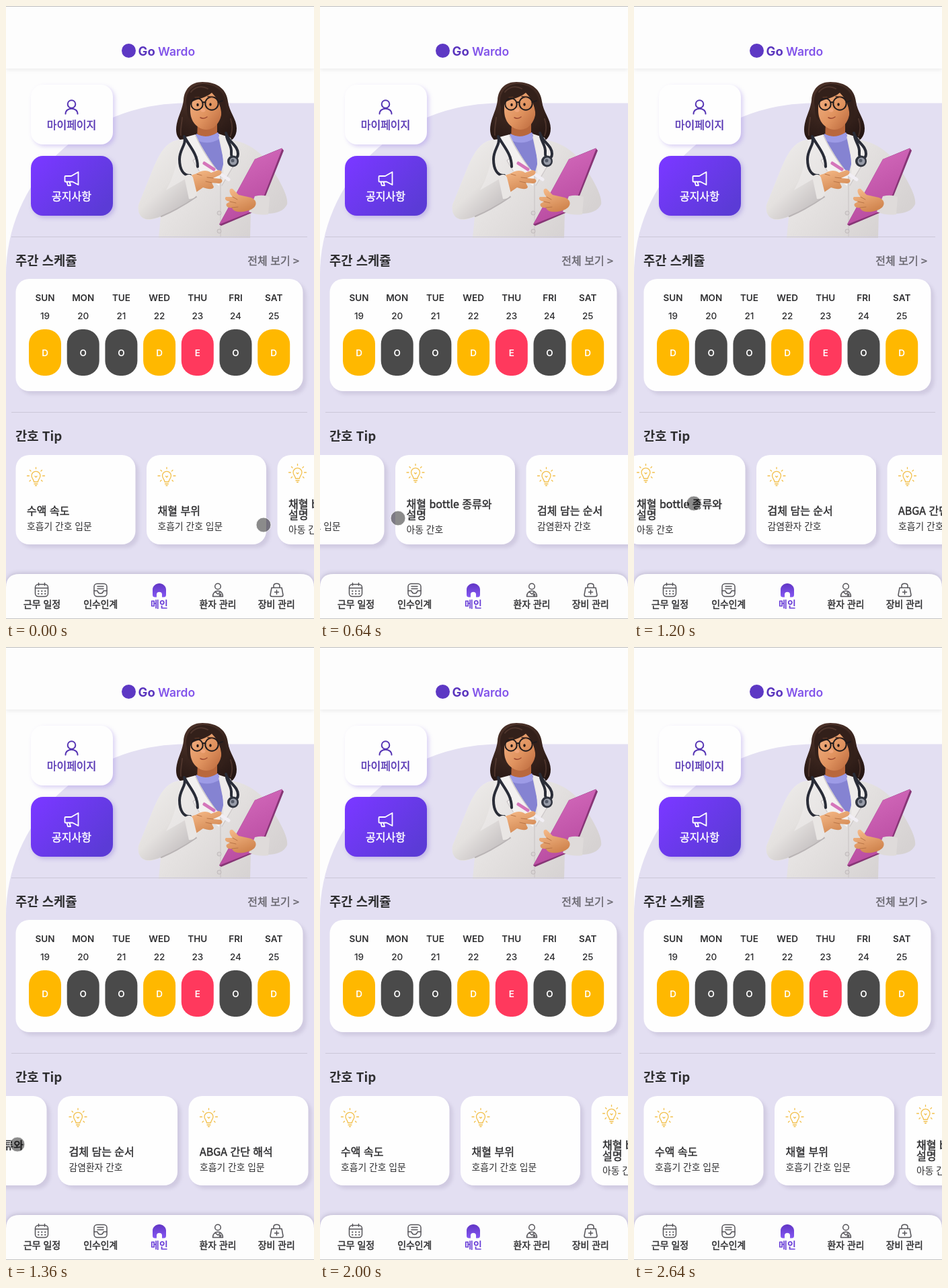
Recreate the animation shown at these times as an HTML page. Size 458 by 912 pixels, loop 2.72 s.

```html
<!DOCTYPE html>
<html lang="ko">
<head>
<meta charset="utf-8">
<title>Nursing home screen</title>
<style>
html, body { margin: 0; width: 100%; height: 100%; overflow: hidden; background: #fdfdfd; }
svg { display: block; width: 458px; height: 912px; }
text { --ink: #2e2e30; font-family: "Noto Sans CJK KR", "Noto Sans CJK", sans-serif; fill: var(--ink); }
.num text, .logo { font-family: Inter, "Noto Sans", sans-serif; }
.mid { text-anchor: middle; }
.h { font-size: 18.8px; font-weight: 700; }
/* The Korean face has no medium weight, so a hairline stroke thickens it. */
.medium { stroke: var(--ink); stroke-width: .45px; }
.btn, .title, .more { font-size: 16px; }
.sub { font-size: 13.8px; }
.num { font-size: 13.5px; }
.nav { font-size: 13.9px; }
.line { fill: none; stroke-linecap: round; stroke-linejoin: round; }
.panel { fill: #fefefe; filter: drop-shadow(5px 5px 2.5px rgba(70, 60, 105, .12)); }
.rule { stroke: #cbc7d8; stroke-width: 1; }
</style>
</head>
<body>
<svg viewBox="0 0 458 912">
  <defs>
    <linearGradient id="violet" x2="1" y2=".7">
      <stop offset=".1" stop-color="#7838ff"/><stop offset="1" stop-color="#5b3bd6"/>
    </linearGradient>
    <linearGradient id="home" x2="0" y2="1">
      <stop stop-color="#6035c4"/><stop offset="1" stop-color="#8558f3"/>
    </linearGradient>
    <linearGradient id="coat" x2="1" y2=".6">
      <stop stop-color="#f4f2f1"/><stop offset=".55" stop-color="#e4e1e0"/><stop offset="1" stop-color="#d6d2d2"/>
    </linearGradient>
    <linearGradient id="sleeve" x2=".7" y2="1">
      <stop stop-color="#f1efee"/><stop offset=".6" stop-color="#e4e1df"/><stop offset="1" stop-color="#c2bdbe"/>
    </linearGradient>
    <linearGradient id="board" x2=".4" y2="1">
      <stop stop-color="#d86fc0"/><stop offset="1" stop-color="#b74a9f"/>
    </linearGradient>
    <radialGradient id="hair" cx=".4" cy=".2" r=".85">
      <stop stop-color="#573a30"/><stop offset=".5" stop-color="#3a251e"/><stop offset="1" stop-color="#251613"/>
    </radialGradient>
    <linearGradient id="face" x2="1" y2="1">
      <stop stop-color="#f3b285"/><stop offset=".55" stop-color="#e0935f"/><stop offset="1" stop-color="#b9663b"/>
    </linearGradient>
    <linearGradient id="hand" x2=".5" y2="1">
      <stop stop-color="#f8bd8c"/><stop offset="1" stop-color="#d18650"/>
    </linearGradient>
    <g id="bulb" class="line" stroke="#f2c04d" stroke-width="1.300">
      <path d="M10.500 21.500C10.500 17.500 7 16.500 7 12.300A6.500 6.500 0 0 1 20 12.300C20 16.500 16.500 17.500 16.500 21.500ZM11 24.500H16M12.500 27H14.500M12 13L13.500 14.500L15 13"/>
      <path d="M13.500 0V2M4.500 4L6 5.500M22.500 4L21 5.500M.500 12.500H3.500M23.500 12.500H26.500M4 20.500L5.500 19M23 20.500L21.500 19"/>
    </g>
  </defs>

  <rect width="458" height="912" fill="#fdfdfd"/>
  <path d="M0 912V400A265 255.500 0 0 1 265 144.500H458V912Z" fill="#e3dff2"/>

  <rect width="458" height="93" fill="#fdfdfd" style="filter:drop-shadow(0 2px 3px rgba(0,0,0,.07))"/>
  <path d="M0 .5H458" stroke="#bdbdbd"/>
  <circle cx="182.500" cy="66.500" r="10.500" fill="#5d38c4"/>
  <text class="logo" x="196.500" y="73.500" font-size="18.500" font-weight="700" style="--ink:#5a35be">Go</text>
  <text class="logo" x="226" y="73.500" font-size="17.500" font-weight="600" style="--ink:#8254ea">Wardo</text>

  <g id="doctor">
    <path d="M292 113C275 113 265 124 264 140C262 157 253 168 253 184C253 199 264 206 280 205L322 203C336 203 343 195 343 182C343 168 332 158 330 142C328 125 316 113 292 113Z" fill="url(#hair)"/>
    <path d="M285 172H314V200Q300 210 284 199Z" fill="#b9683d"/>
    <path d="M283 190Q298 199 315 188L326 203L328 262H306L278 206Z" fill="#8583d2"/>
    <path d="M283 190Q298 199 315 188L317 198Q300 208 282 199Z" fill="#9d9be6"/>
    <path d="M258 199C236 201 226 225 216 249L197 296C195 310 203 319 216 318L230 314L227 345H363L364 306C386 311 411 311 418 295C420 284 409 263 396 243C383 221 366 206 340 200L316 194L324 232L318 254L283 196Z" fill="url(#coat)"/>
    <path d="M259 199C235 201 226 225 216 249L197 296C195 311 203 319 216 317C239 313 261 297 283 284L274 253L238 274C250 253 256 231 259 199Z" fill="url(#sleeve)"/>
    <path d="M283 284Q257 302 231 313" class="line" stroke="#b9b4b5" stroke-width="2"/>
    <path d="M267 195L282 191C291 213 306 234 319 251L317 268L285 243L278 230L285 224Z" fill="#f3f1f0"/>
    <path d="M316 190L334 196L346 225L335 232L337 240L320 268C326 246 323 215 316 190Z" fill="#eeebea"/>
    <path d="M282 193C291 214 306 235 319 251V343M285 224L278 230L287 245M335 232L337 240L321 267" class="line" stroke="#cdc8c9" stroke-width="1.300"/>
    <g fill="#d8d3d3" stroke="#b5afb1" stroke-width=".7">
      <circle cx="317" cy="308" r="3"/><circle cx="317" cy="335" r="3"/>
    </g>

    <path d="M265 194C269 207 258 212 258 228C258 243 264 253 274 252M265 194C273 209 285 220 285 239" class="line" stroke="#292c37" stroke-width="4"/>
    <path d="M327 189C331 203 345 207 345 220C345 230 334 229 335 218C336 208 330 204 328 194" class="line" stroke="#292c37" stroke-width="4"/>
    <circle cx="337.500" cy="231" r="8.500" fill="#30343f"/><circle cx="338" cy="231" r="5.500" fill="#989ca8"/><circle cx="337" cy="230" r="2.500" fill="#555b69"/>

    <path d="M274 145C274 134 280 126 295 125C314 125 322 138 321 155C320 173 310 184 298 184C284 183 274 172 274 155Z" fill="url(#face)"/>
    <path d="M269 150C265 132 274 118 292 116C311 116 325 126 327 148C329 164 325 176 319 180C323 158 319 142 306 129C297 137 284 138 276 143C272 149 273 160 275 170C269 166 269 156 269 150Z" fill="#33201a"/>
    <path d="M275 128C281 120 291 118 300 123M262 166C261 178 259 184 260 192M334 168C337 177 337 185 334 193" class="line" stroke="#6b4a3e" stroke-width="2" opacity=".5"/>
    <g class="line" stroke="#211b1c" stroke-width="2">
      <circle cx="284" cy="146" r="8.700"/><circle cx="306" cy="145" r="9.700"/>
      <path d="M292.500 144Q294.500 142 296.500 144M315.500 143L322 141"/>
    </g>
    <g fill="#261816"><ellipse cx="285" cy="147" rx="1.700" ry="2.300"/><ellipse cx="304" cy="146.500" rx="1.700" ry="2.300"/></g>
    <path d="M281 136L287 135.500M300 134.500L308 135.500" class="line" stroke="#5a3424" stroke-width="1.500"/>
    <ellipse cx="293" cy="155" rx="3.500" ry="2.800" fill="#f0a57a"/>
    <path d="M289 166Q294 169 299 165" class="line" stroke="#9d4a33" stroke-width="1.500"/>

    <path d="M370 228L410 211.500L413 215L385 285L367 307L320 327L317 325Z" fill="#873576"/>
    <path d="M370 228L411 211.500L383 284L365 306L317 325Z" fill="url(#board)"/>
    <path d="M370 283Q382 280 392 284L390 310Q374 312 361 306Z" fill="#dfdbda"/>
    <path d="M364 285L346 281L337 272C331 270 331 278 337 284L327 284C324 287 327 290 333 291L328 294C326 298 331 301 336 300C338 307 350 308 361 304C374 300 375 289 364 285Z" fill="url(#hand)"/>
    <path d="M333 291L342 293M336 300L345 299M337 284L344 288" class="line" stroke="#b97547" stroke-width="1"/>

    <path d="M295 234L331 258" class="line" stroke="#f1eef4" stroke-width="5"/>
    <path d="M295 234L309 243" class="line" stroke="#d575ba" stroke-width="5"/>
    <path d="M272 253L284 249C291 244 300 244 305 248L316 244C322 245 322 249 317 252L308 256L319 257C323 259 322 263 317 264L306 263L309 269C308 274 299 272 293 270C287 274 282 278 277 280Z" fill="url(#hand)"/>
    <path d="M308 256L299 255M306 263L297 261M284 250L291 252" class="line" stroke="#b97547" stroke-width="1"/>
    <path d="M265 254Q274 247 278 255L284 279Q281 288 272 287Z" fill="#e9e6e4"/>
  </g>

  <rect x="37" y="117" width="122" height="89" rx="18" fill="#fefefe" style="filter:drop-shadow(3px 3px 3px rgba(110,70,220,.23))"/>
  <g class="line" stroke="#5736b4" stroke-width="2">
    <circle cx="97.500" cy="146" r="5.800"/><path d="M88.500 160.500C88.500 150 106.500 150 106.500 160.500"/>
  </g>
  <text class="btn medium mid" x="97.500" y="183" style="--ink:#5736b4">마이페이지</text>
  <rect x="37" y="223" width="122" height="89" rx="18" fill="url(#violet)" style="filter:drop-shadow(3px 3px 3px rgba(90,60,200,.25))"/>
  <path class="line" stroke="#fff" stroke-width="1.800" d="M107.500 247V266L99 261.500H88.500Q87.500 261.500 87.500 260.500V254Q87.500 253 88.500 253H97ZM90.500 262L92 267H96L94.500 262"/>
  <text class="btn medium mid" x="97.500" y="288.500" style="--ink:#fff">공지사항</text>

  <path class="rule" d="M8 343.500H448M8 604.500H448"/>
  <text class="h" x="14" y="386">주간 스케쥴</text>
  <text class="more medium" x="436" y="385" text-anchor="end" style="--ink:#6a6870">전체 보기 &gt;</text>
  <rect class="panel" x="14.500" y="406" width="427" height="167" rx="20"/>
  <g id="week" class="num mid"></g>

  <text class="h" x="14" y="647">간호 Tip</text>
  <g id="tips"></g>

  <path d="M0 912V865Q0 845 20 845H438Q458 845 458 865V912Z" fill="#fdfdfd" style="filter:drop-shadow(0 -1px 3px rgba(50,40,80,.22))"/>
  <g class="line" stroke="#555459" stroke-width="1.500">
    <rect x="43.500" y="860.500" width="19" height="18" rx="4.500"/>
    <path d="M43.500 866H62.500M48.500 858.500V862M57.500 858.500V862"/>
    <path d="M48 870.500H58.500M48 874.500H58.500" stroke-dasharray=".5 4.500" stroke-width="2"/>
    <rect x="131" y="859.500" width="19" height="19" rx="4.500"/>
    <path d="M131 870H136Q137 874 140.500 874T145 870H150M136 863.500H145M136 867H145"/>
    <circle cx="315" cy="863.500" r="4.300"/>
    <path d="M307.500 878.500C307.500 867.500 322.500 867.500 322.500 878.500ZM311 871.500L315 875L319 871.500"/>
    <circle cx="318.500" cy="876" r="1.200"/>
    <path d="M395 865.500H410L412 876Q412 878.500 409.500 878.500H395.500Q393 878.500 393 876ZM398 865V862.500C398 858 407 858 407 862.500V865M402.500 869V875M399.500 872H405.500"/>
  </g>
  <path d="M218 868C218 863 223 859 228 859C233 859 238 863 238 868V876Q238 879.500 234.500 879.500H232V875C232 870.500 224 870.500 224 875V879.500H221.500Q218 879.500 218 876Z" fill="url(#home)"/>
  <g id="nav" class="nav mid"></g>
  <path d="M0 911.500H458" stroke="#c4c4c4"/>

  <circle id="cursor" r="11" fill="#000" fill-opacity=".45" stroke="#fff" stroke-opacity=".85"/>
</svg>
<script>
const $ = id => document.getElementById(id);
const label = (x, y, s, attrs = "") => `<text x="${x}" y="${y}" ${attrs}>${s}</text>`;

const shift = { D: "#ffb800", O: "#4a4a4a", E: "#ff395d" };
$("week").innerHTML = "SUN MON TUE WED THU FRI SAT".split(" ").map((day, i) => {
  const x = 58 + i * 56.7, code = "DOODEOD"[i];
  return label(x, 439, day, 'font-weight="600"') + label(x, 466, 19 + i, 'font-weight="500"') +
    `<rect x="${x - 24}" y="481" width="48" height="69" rx="22"  fill="${shift[code]}"/>` +
    label(x, 520.5, code, 'font-weight="600" style="--ink:#fff"');
}).join("");

const tips = [
  ["수액 속도", "호흡기 간호 입문"],
  ["채혈 부위", "호흡기 간호 입문"],
  ["채혈 bottle 종류와|설명", "아동 간호"],
  ["검체 담는 순서", "감염환자 간호"],
  ["ABGA 간단 해석", "호흡기 간호 입문"],
  ["수혈 순서", "혈액 간호"]
];
$("tips").innerHTML = tips.map(([title, sub], i) => {
  const lines = title.split("|"), lift = lines.length > 1 ? 5 : 0;
  return `<g transform="translate(${14.5 + i * 194.5} 668)">
    <rect class="panel" width="178" height="133" rx="20"/>
    <use href="#bulb" x="16.5" y="${18.5 - lift}"/>` +
    lines.map((s, n) => label(16.5, 89 - lift * 2 + n * 15.5, s, 'class="title medium"')).join("") +
    label(16.5, 111 + lift, sub, 'class="sub"') + "</g>";
}).join("");

$("nav").innerHTML = ["근무 일정", "인수인계", "메인", "환자 관리", "장비 관리"].map((s, i) =>
  label(53.5 + i * 87.2, 895, s, i === 2 ? 'font-weight="700" style="--ink:#6b40d8"' : 'class="medium"')).join("");

const LOOP = 2720, TICK = 80, RESET = 1920;
// Rows: time, scroll offset, pointer x, pointer y
const path = [
  [0, 0, 383, 772], [80, 35, 345, 771], [160, 155, 218, 768], [240, 263, 102, 766],
  [320, 288, 68, 765], [400, 291.5, 68, 765], [640, 291.5, 116, 762],
  [1040, 291.5, 213, 740], [1120, 303, 202, 740], [1200, 416, 89, 740],
  [1280, 482, 25, 740], [1360, 521, 17, 740], [1440, 541, 17, 740],
  [1520, 550, 17, 740], [1680, 555, 17, 740], [RESET, 555, 17, 740]
];

function pose(t) {
  const i = path.findIndex(p => p[0] > t), a = path[i - 1], b = path[i];
  const k = (t - a[0]) / (b[0] - a[0]);
  return a.map((v, n) => v + (b[n] - v) * k);
}

function draw() {
  const t = Math.floor(performance.now() % LOOP / TICK) * TICK;
  const active = t < RESET;
  const [, scroll, x, y] = active ? pose(t) : path[0];
  $("tips").setAttribute("transform", `translate(${-scroll} 0)`);
  $("cursor").setAttribute("transform", `translate(${x} ${y})`);
  $("cursor").setAttribute("visibility", active ? "visible" : "hidden");
  requestAnimationFrame(draw);
}
draw();
</script>
</body>
</html>
```
